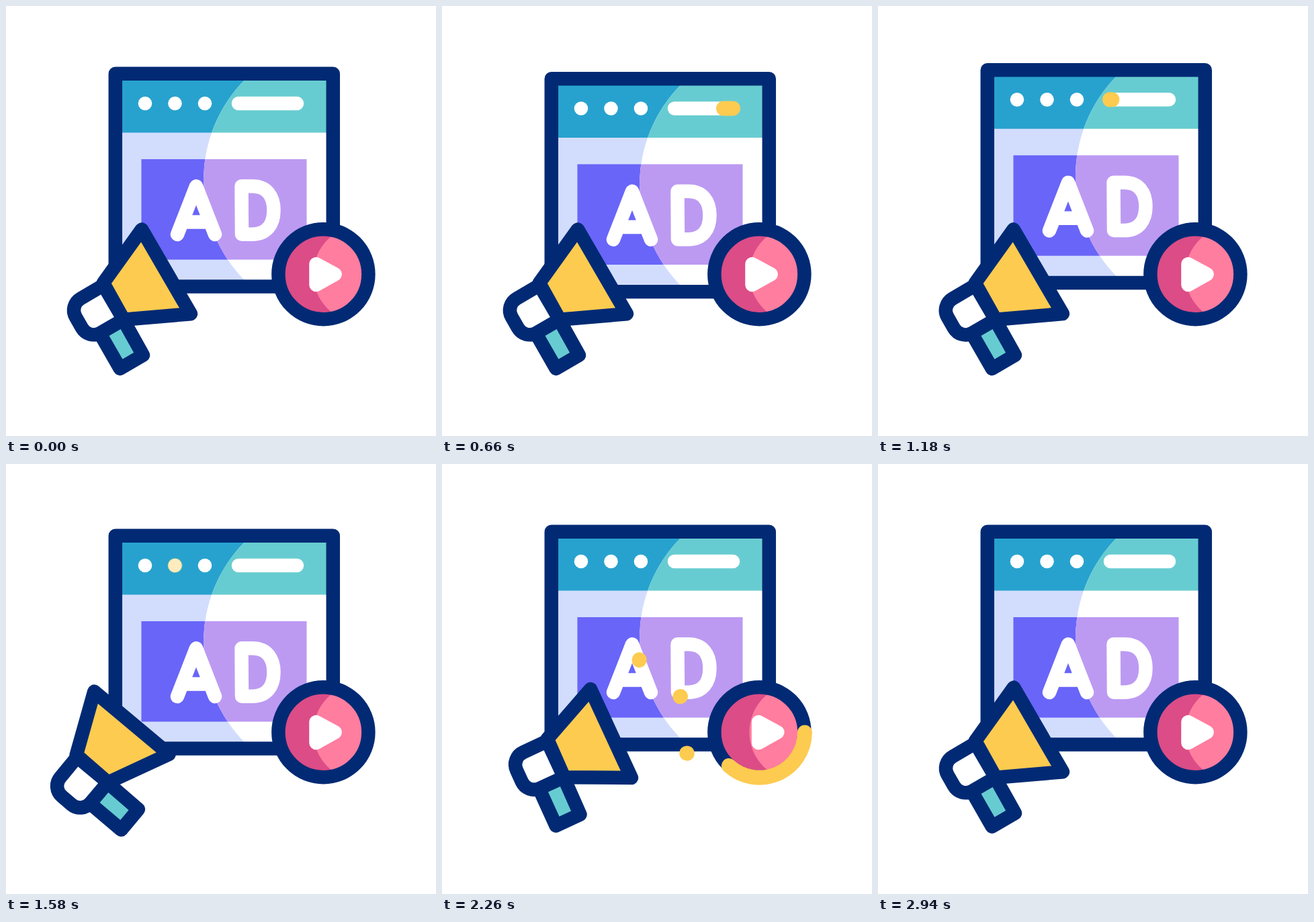
These frames come from a looping animation (640 by 640 pixels, 3260 ms). An HTML page:

```html
<!DOCTYPE html>
<html lang="en">
<head>
<meta charset="utf-8">
<title>Ad window</title>
<style>
  html, body { margin: 0; width: 100%; height: 100%; overflow: hidden; background: #fff; }
  svg { display: block; width: 100%; height: 100%; }
  .line { stroke: #022a74; stroke-width: 20.5; stroke-linejoin: round; }
  .white { fill: none; stroke: #fff; stroke-width: 20.5; stroke-linecap: round; stroke-linejoin: round; }
  .glow { fill: none; stroke: #fdcb50; stroke-width: 22; stroke-linecap: round; }
</style>
</head>
<body>
<svg viewBox="0 0 640 640">
  <defs>
    <clipPath id="shine"><circle cx="506.5" cy="259.2" r="212.5"/></clipPath>
    <clipPath id="disc"><circle cx="472.4" cy="399.2" r="62"/></clipPath>
  </defs>

  <g id="window">
    <path fill="#d2ddfd" d="M163 101H487V418H163Z"/>
    <path fill="#27a2ce" d="M163 101H487V188.5H163Z"/>
    <path fill="#6965f8" d="M201.5 228H447.5V377.5H201.5Z"/>
    <g clip-path="url(#shine)">
      <path fill="#fff" d="M163 101H487V418H163Z"/>
      <path fill="#67ccd1" d="M163 101H487V188.5H163Z"/>
      <path fill="#bc9af2" d="M201.5 228H447.5V377.5H201.5Z"/>
    </g>
    <path class="line" fill="none" d="M162.8 100.8H486.8V417.6H162.8Z"/>
    <path class="white" d="M255 340L283 268.3L311 340M264 321.5H302"/>
    <path class="white" d="M350.5 268.3H367C388 268.3 398.5 283 398.5 304S388 339.7 367 339.7H351Z"/>
    <path class="white" d="M346 145H433"/>
    <g id="dots"></g>
    <path class="glow" id="bar"/>
  </g>

  <g id="megaphone" class="line">
    <path fill="#67ccd1" d="M139 486L174 466L204 519.7L169.7 539.7Z"/>
    <path fill="#fff" d="M145 415.5L111 435.5A20 20 0 0 0 103.7 462.9L113 479.2A20 20 0 0 0 140.4 486.6L175 466.7Z"/>
    <path fill="#fdcb50" d="M202 332.5L275 458.2L175.2 466.8L144.8 412.3Z"/>
  </g>

  <g id="sparks"></g>

  <circle cx="472.4" cy="399.2" r="62" fill="#dc4c86"/>
  <circle cx="530" cy="399.2" r="72.6" fill="#ff7d9f" clip-path="url(#disc)"/>
  <circle class="line" cx="472.4" cy="399.2" r="67" fill="none"/>
  <path class="glow" id="ring"/>
  <path id="play" class="white" style="fill:#fff" d="M461.5 384V415L489.7 399.3Z"/>
</svg>
<script>
const LOOP = 3260;
const $ = id => document.getElementById(id);

function add(parent, tag, attrs) {
  const el = document.createElementNS("http://www.w3.org/2000/svg", tag);
  for (const key in attrs) el.setAttribute(key, attrs[key]);
  return $(parent).appendChild(el);
}

const ease = (t, from, to) => {
  const u = Math.min(1, Math.max(0, (t - from) / (to - from)));
  return u * u * (3 - 2 * u);
};

// Eased value through [time, value] keys, starting at zero.
const track = (t, keys) => {
  let value = 0;
  for (let i = 1; i < keys.length; i++)
    value += (keys[i][1] - keys[i - 1][1]) * ease(t, keys[i - 1][0], keys[i][0]);
  return value;
};

const windowKeys = [[0, 0], [430, 25.6], [985, -22.5], [1383, 12], [1780, 0]];
const megaphoneKeys = [[1160, 0], [1680, -22], [2220, 5.5], [2680, 0]];
const playKeys = [[1960, 0], [2290, 9.8], [2640, 0]];

const flashes = [296, 251.5, 207].map(cx => {
  add("dots", "circle", { cx, cy: 145, r: 10.3, fill: "#fff" });
  return add("dots", "circle", { cx, cy: 145, r: 11, fill: "#fdcb50" });
});
const sparks = [-68.7, -27.9, 14.6].map(angle => ({
  el: add("sparks", "path", { class: "glow" }),
  angle: angle * Math.PI / 180
}));

// Shows the part of a path between two progress values.
function trim(el, tail, head, pathAt) {
  const visible = head > tail + 0.0005;
  el.style.display = visible ? "" : "none";
  if (visible) el.setAttribute("d", pathAt(tail, head));
}

const at = (cx, cy, r, angle) =>
  `${(cx + r * Math.cos(angle)).toFixed(2)} ${(cy + r * Math.sin(angle)).toFixed(2)}`;

function arc(tail, head) {
  const point = u => at(472.4, 399.2, 67.5, u * 2 * Math.PI);
  const middle = point((tail + head) / 2);
  return `M${point(tail)}A67.5 67.5 0 0 1 ${middle}A67.5 67.5 0 0 1 ${point(head)}`;
}

function draw(t) {
  $("window").setAttribute("transform", `translate(0 ${track(t, windowKeys)})`);
  $("megaphone").setAttribute("transform", `rotate(${track(t, megaphoneKeys)} 184 537)`);
  $("play").setAttribute("transform", `translate(${track(t, playKeys)} 0)`);

  trim($("bar"), ease(t, 740, 1240), ease(t, 560, 960),
    (tail, head) => `M${433 - 88 * tail} 145H${433 - 88 * head}`);
  trim($("ring"), ease(t, 2250, 2940), ease(t, 1920, 2750), arc);

  flashes.forEach((el, i) => {
    const u = (t - 1200 - 340 * i) / 340;
    el.setAttribute("opacity", u > 0 && u < 1 ? Math.sin(Math.PI * u) : 0);
  });
  for (const { el, angle } of sparks)
    trim(el, ease(t, 2380, 2690), ease(t, 2235, 2560), (tail, head) =>
      `M${at(251, 401, 117 + 40 * tail, angle)}L${at(251, 401, 117 + 40 * head, angle)}`);
}

function frame() {
  draw(performance.now() % LOOP);
  requestAnimationFrame(frame);
}
frame();
</script>
</body>
</html>
```
